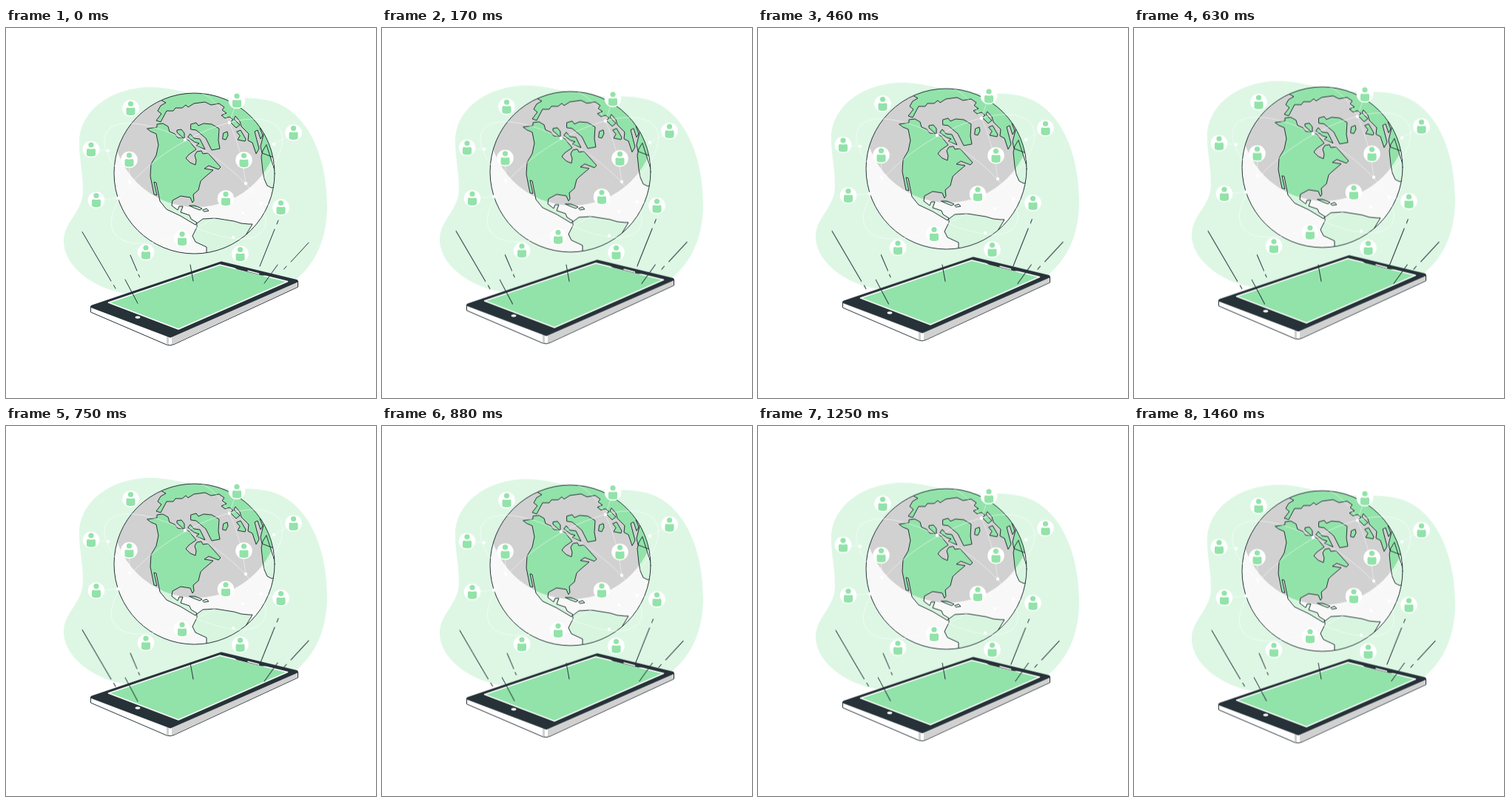
Animation of 500x500 px, one loop 1.5 s. Source, as an HTML page:

```html
<!DOCTYPE html>
<html lang="en">
<head>
<meta charset="utf-8">
<title>Connected world</title>
<style>
  html, body { margin: 0; width: 100%; height: 100%; overflow: hidden; background: #fff; }
  svg { display: block; width: 100vw; height: 100vh; }
  .float { animation: float 1.5s linear infinite; }
  .rays { animation: pulse 1.5s step-end infinite; transform-origin: 253px 330px; }
  @keyframes float {
    50% { transform: translateY(-10px); }
  }
  @keyframes pulse {
    0%, 50% { transform: scale(1); }
    2.7% { transform: scale(1.02); }
    52.7%, 99.9% { transform: scale(.987); }
  }
  .ink { fill: none; stroke: #263238; stroke-linecap: round; stroke-linejoin: round; }
  .net { fill: none; stroke: #fff; stroke-width: .8; opacity: .6; }
  .round { stroke-linejoin: round; }
</style>
</head>
<body>
<svg viewBox="0 0 500 500">
  <defs>
    <clipPath id="globe"><circle cx="254.5" cy="196.5" r="108.5"/></clipPath>
    <clipPath id="shade"><circle cx="257" cy="129" r="113"/></clipPath>
    <g id="user">
      <circle r="11.3" fill="#fff"/>
      <circle cy="-6" r="3.6" fill="#92e3a9"/>
      <path d="M-6 1Q-6-1-4-1Q0 0 4-1Q6-1 6 1V7Q6 9 4 9Q0 10-4 9Q-6 9-6 7Z" fill="#92e3a9"/>
    </g>
    <g id="land">
      <!-- North and Central America -->
      <path d="M191 136L204 134 204 130 212 129 219 133 221 140 228 143 232 148 240 149 231 141 231 138 237 137 241 142 241 149 247 152 257 164 247 171 243 176 249 182 256 185 257 179 255 172 258 167 264 166 266 170 273 169 290 188 287 191 274 186 268 190 280 192 267 203 263 207 260 219 253 225 254 233 252 236 249 229 236 227 225 233 224 240 232 246 234 241 239 241 236 249 248 253 250 258 258 263 256 266 236 254 217 245 208 234 203 209 200 208 204 226 200 225 195 200 196 184 203 172 206 158 203 143 196 140Z"/>
      <!-- South America -->
      <path d="M258 264L266 258 283 257 308 261 318 264 328 265 333 265 324 280 326 300 300 312 271 312V296L256 289 252 281 258 269Z"/>
      <!-- Arctic rim and Europe -->
      <path d="M207 96L216 101 209 105 205 112 210 116 203 125 209 127 217 112 226 112 229 108 238 108 243 104 246 107 254 102 269 100 277 104 288 102 295 107 292 111 298 115 291 118 296 122 302 120 307 124 303 127 311 135 316 131 308 123 310 119 316 126 318 133 328 143 327 152 333 155 338 170 342 163 336 140 340 138 344 150 347 145 343 135 349 140 344 160 346 169 370 178 380 80 200 70Z"/>
      <!-- Africa -->
      <path d="M347 166L345 174 347 193 349 204 353 213 359 216 370 214 352 158Z"/>
      <!-- Greenland and islands -->
      <path d="M250 130L257 128 260 132 267 129 278 130 288 136 287 152 289 163 278 165 270 149 257 138 250 137Z"/>
      <path d="M246 147L249 143 254 149 262 150 269 164 257 159 261 156 255 154Z"/>
      <path d="M294 142L299 140 300 145 297 151 293 150Z"/>
      <path d="M312 140L317 138 324 150 323 153 313 151 316 146Z"/>
      <path d="M248 240L255 240 265 244 262 246 254 243Z"/>
      <path d="M266 246L271 244 274 247 268 248Z"/>
    </g>
  </defs>

  <g class="float">
    <path fill="#def7e5" d="M195 80C222 80 240 87 268 92S325 92 350 97C405 106 434 170 434 240C434 285 418 320 390 341L250 350 165 359C125 355 78 325 78 288C78 262 104 248 104 220S99 180 99 155C99 110 145 80 195 80Z"/>

    <g clip-path="url(#globe)">
      <circle cx="254.5" cy="196.5" r="110" fill="#f8f8f8"/>
      <use href="#land" fill="#d8f5df"/>
      <g clip-path="url(#shade)">
        <circle cx="254.5" cy="196.5" r="110" fill="#d1d1d1"/>
        <use href="#land" fill="#92e3a9"/>
      </g>
      <use href="#land" class="ink"/>
    </g>
    <circle class="ink" cx="254.5" cy="196.5" r="108.5"/>

    <g class="net">
      <ellipse cx="242" cy="207" rx="125" ry="49" transform="rotate(32 242 207)"/>
      <ellipse cx="258" cy="207" rx="132" ry="55" transform="rotate(-32 258 207)"/>
      <path d="M265 88Q288 100 302 128L312 98M302 128Q319 165 324 210"/>
    </g>
    <g id="links" class="net"></g>
    <g id="nodes" fill="#fff"></g>
    <g id="users"></g>

    <!-- Phone -->
    <path class="round" fill="#fff" stroke="#263238" d="M114.5 376V384L217 428Q222 430 227 427.500L394.500 350V342L221 412Z"/>
    <path fill="#d1d1d1" d="M224 417L394 342V349.500L227 427H224Z"/>
    <path fill="#d1d1d1" d="M217 417h3v11l-3-1Z"/>
    <path class="round" fill="#263238" stroke="#263238" stroke-width="4" d="M116.500 376.500L291 317.500 392.500 342 222 416.500Z"/>
    <path class="round" fill="#92e3a9" stroke="#fff" stroke-width="1.6" d="M138.500 371L289 320 380.500 342.500 233 407Z"/>
    <path fill="#263238" d="M306 322L312 326 346 334.500 358 334 310 321Z"/>
    <path stroke="#fff" stroke-width="1.4" stroke-linecap="round" d="M327 328.300L341.500 332"/>
    <ellipse cx="178" cy="391" rx="3.4" ry="1.7" fill="#fff"/>
  </g>

  <path class="ink rays" d="M103 275.500L142 342M145.500 347.500L148 352M168 307L177 328M179 333L180.500 336.500M161 340L178 372M249 320L253 342M367 320L349 345M363 272L343 322M368 260L366 265M409 290L385 316M379 322L375.500 326"/>
</svg>
<script>
  const add = (parent, tag, attrs) => {
    const el = document.createElementNS('http://www.w3.org/2000/svg', tag);
    for (const key in attrs) el.setAttribute(key, attrs[key]);
    document.getElementById(parent).append(el);
  };

  const users = [[115, 164], [388.5, 141.5], [122, 232.5], [371.5, 242.5], [166.5, 178], [168.5, 108.5],
    [312, 98], [321.5, 178.5], [297, 230.5], [238, 284.5], [189, 303], [316.5, 305.5]];
  const nodes = [[138, 166], [362, 157], [151, 230], [345, 237], [167, 208],
    [242, 151], [302, 128], [324, 210], [307, 283], [320, 250]];

  users.forEach(([x, y]) => add('users', 'use', { href: '#user', x, y }));
  nodes.forEach(([cx, cy]) => add('nodes', 'circle', { cx, cy, r: 2.2 }));
  // The first five users each hang on the node of the same index.
  nodes.slice(0, 5).forEach((node, i) => add('links', 'path', { d: `M${users[i]}L${node}` }));
</script>
</body>
</html>
```
